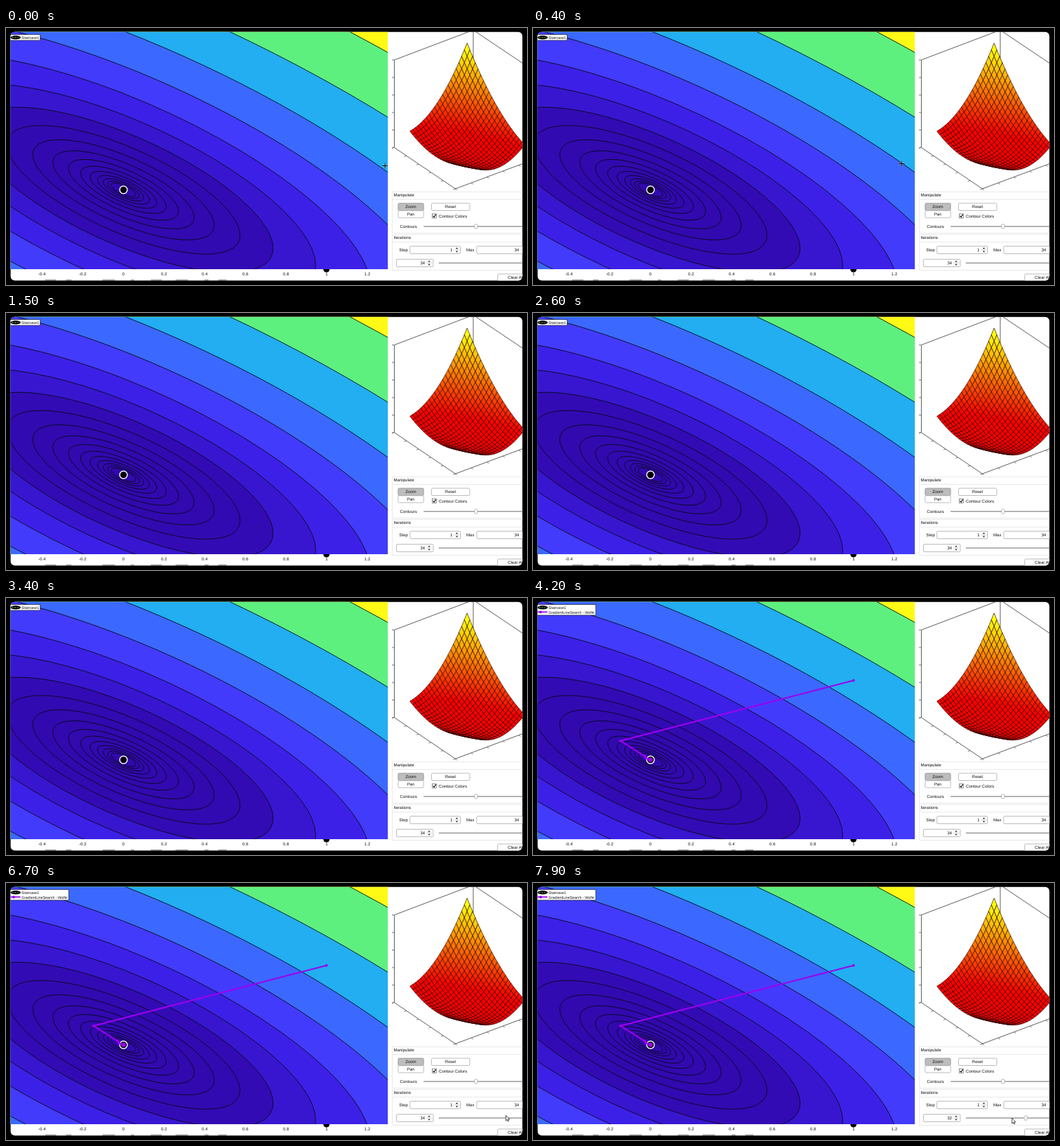
Animation, 756 px wide and 374 px high, one loop 8000 ms. Source, as an HTML page:

```html
<!DOCTYPE html>
<html lang="en">
<head>
<meta charset="utf-8">
<title>Contour line search</title>
<style>
  html, body { margin: 0; width: 100%; height: 100%; overflow: hidden; background: #000; }
  svg { display: block; width: 756px; height: 374px; }
  text { font: 6.1px "Liberation Sans", Arial, sans-serif; fill: #111; text-rendering: geometricPrecision; }
  .small { font-size: 5.4px; }
  .end { text-anchor: end; }
  .mid { text-anchor: middle; }
</style>
</head>
<body>
<svg viewBox="0 0 756 374">
  <defs>
    <clipPath id="screen"><rect x="6.7" y="5.8" width="742.6" height="361.6" rx="6"/></clipPath>
    <clipPath id="plotArea"><rect x="6" y="5" width="548" height="346"/></clipPath>
  </defs>
  <rect width="756" height="374"/>
  <g clip-path="url(#screen)">
    <rect width="756" height="374" fill="#fff"/>
    <g id="contours" clip-path="url(#plotArea)"></g>
    <g id="ticks"></g>
    <path d="M460.4 351A4.6 4.6 0 0 0 469.6 351Z"/>
    <path d="M57 367H73M87 367H95M140 367H158M181 367H186M210 367H226M246 367H264M288 367H294M308 367H320" stroke="#333"/>
    <circle cx="170.5" cy="235.5" r="5.5" stroke="#fff" stroke-width="1.4"/>
    <g id="route" fill="#9b00f0"></g>
    <g id="legend">
      <rect id="legendBox" x="5" y="9.5" fill="#fff" stroke="#222" stroke-width=".7"/>
      <ellipse cx="14" cy="13.8" rx="7.5" ry="2.7"/>
      <path d="M8 13.8H18" stroke="#6c9a4a" stroke-width="1" stroke-dasharray="3 1"/>
      <text class="small" x="22.6" y="15.8">Staircase1</text>
      <g id="legendRoute">
        <path d="M6 20.4H21" stroke="#9b00f0" stroke-width="1.6"/>
        <circle cx="11" cy="20.4" r="2" fill="#9b00f0"/>
        <text class="small" x="22.6" y="22.6">GradientLineSearch - Wolfe</text>
      </g>
    </g>
    <g id="surface"></g>
    <g id="panel"></g>
    <g id="thumb"><rect x="-2" y="338.8" width="4" height="6.4" rx="1" fill="#fff" stroke="#aaa" stroke-width=".8"/></g>
    <g id="cross">
      <path d="M-4 0H4M0 -4V4" stroke="#fff" stroke-opacity=".45" stroke-width="2.2"/>
      <path d="M-4 0H4M0 -4V4" stroke="#000" stroke-width="1"/>
    </g>
    <path id="arrow" d="M0 -4V4L1.8 2.3L3 5L4.2 4.4L3 1.9H5.4Z" fill="#fff" stroke="#000" stroke-width=".7"/>
  </g>
</svg>
<script>
const NS = "http://www.w3.org/2000/svg";
const $ = id => document.getElementById(id);

function add(parent, tag, attrs, content) {
  const node = document.createElementNS(NS, tag);
  for (const key in attrs) node.setAttribute(key, attrs[key]);
  if (content !== undefined) node.textContent = content;
  parent.appendChild(node);
  return node;
}

const quadratic = (x, y) => 2 * x * x + 2 * x * y + y * y;

function buildContours() {
  const fills = ["#5df07f", "#22aef1", "#3b69ff", "#433bfc", "#3d20e7", "#3816cf", "#330bb4", "#320ab1", "#3109ae"];
  const group = $("contours");
  add(group, "rect", { width: 560, height: 360, fill: "#fff916" });
  for (let k = 0; k < 17; k++) {
    add(group, "circle", {
      r: Math.exp((2.387 - k / 2) / 2),
      transform: "matrix(295 115.5 0 115.5 170.5 235.5)",
      fill: fills[Math.min(k, fills.length - 1)],
      stroke: "#080818", "stroke-width": 0.9, "vector-effect": "non-scaling-stroke"
    });
  }
  for (let i = -2; i <= 6; i++) {
    add($("ticks"), "text", { x: 170.3 + i * 59, y: 359.6, class: "mid" }, String(i / 5));
  }
}

function buildRoute() {
  const points = [[465, 120], [127, 208], [162, 230], [164, 233], [170.5, 235.5]];
  add($("route"), "polyline", { points: points.join(" "), fill: "none", stroke: "#9b00f0", "stroke-width": 2.1 });
  points.forEach(([cx, cy], i) => add($("route"), "circle", { cx, cy, r: i === 4 ? 3.2 : 2 }));
}

function buildSurface() {
  const group = $("surface"), cells = 21;
  const floor = (s, t) => [563 + 89 * s + 115 * t, 174 + 60 * s - 43 * t];
  const height = (a, b) => quadratic(1.3 - 1.85 * a, 3 * b - 1);
  const project = (a, b) => {
    const [x, y] = floor(0.03 + 0.94 * a, 0.177 + 0.722 * b);
    return [x, y - 2 - 9 * height(a, b)];
  };
  add(group, "path", {
    d: "M678 131V3L563.5 46.5V174L652 234L767 191M678 3L767 63",
    fill: "none", stroke: "#333", "stroke-width": 0.8
  });
  let marks = "";
  for (let i = 0; i <= 5; i++) {
    marks += `M563 ${46.5 + i * 25.5}h-3`;
    const [x, y] = floor(i / 5, 0), [u, v] = floor(1, i / 5);
    marks += `M${x} ${y}l-3 1.2M${u} ${v}l2.6 1.8`;
  }
  add(group, "path", { d: marks, stroke: "#555", "stroke-width": 0.8 });
  for (let i = 0; i < cells; i++) {
    for (let j = cells - 1; j >= 0; j--) {
      const corners = [[i, j], [i + 1, j], [i + 1, j + 1], [i, j + 1]];
      const level = (height((i + 0.5) / cells, (j + 0.5) / cells) - 2) / 9.6;
      add(group, "polygon", {
        points: corners.map(([a, b]) => project(a / cells, b / cells)).join(" "),
        fill: `rgb(255,${Math.round(255 * Math.max(0, Math.min(1, level)))},0)`,
        stroke: "#200", "stroke-width": 0.65, "stroke-linejoin": "round"
      });
    }
  }
}

function buildPanel() {
  const panel = $("panel");
  const box = (x, y, width, height, fill = "#fff", stroke = "#aaa", rx = 1.5) =>
    add(panel, "rect", { x, y, width, height, fill, stroke, rx, "stroke-width": 0.8 });
  const label = (x, y, content, cls = "") => add(panel, "text", { x, y, class: cls }, content);
  const line = (d, stroke, width = 0.8) => add(panel, "path", { d, stroke, fill: "none", "stroke-width": width });
  const spinner = (x, y) => {
    line(`M${x - 5} ${y}h10`, "#ccc", 0.6);
    add(panel, "path", { d: `M${x - 1.8} ${y - 1.6}h3.6l-1.8 -2.2zM${x - 1.8} ${y + 1.6}h3.6l-1.8 2.2z`, fill: "#333" });
  };

  line("M756 238.5H560.5V298.5H756M756 300.5H560.5V352.5H756M561 249.5H756M561 311.5H756", "#e4e4e4");
  label(562.5, 245.2, "Manipulate");
  label(562.5, 307.2, "Iterations");
  box(569, 255, 37, 10.5, "#bdbdbd", "#909090");
  box(569, 265.8, 37, 10.2);
  box(617.5, 255, 55.5, 10.5);
  label(587.3, 262.4, "Zoom", "mid");
  label(587.3, 273, "Pan", "mid");
  label(645, 262.4, "Reset", "mid");

  box(618.5, 270.5, 6, 6, "#fff", "#777", 0);
  line("M619.6 273.5L621.2 275.2L623.8 271.4", "#000", 1.1);
  label(628, 275.8, "Contour Colors");
  label(571.5, 290.8, "Contours");
  line("M606 288.8H756", "#9a9a9a", 1.4);
  box(680, 285.6, 4, 6.4, "#fff", "#aaa", 1);

  label(570.5, 325.2, "Step");
  box(586, 317.5, 73.5, 11);
  label(648, 325.4, "1", "end");
  spinner(654.2, 323);
  label(668, 325.2, "Max");
  box(683, 317.5, 73, 11);
  label(744.5, 325.4, "34", "end");
  spinner(751.5, 323);
  box(566.5, 336.5, 53.5, 11);
  label(608, 344.3, "34", "end").id = "count";
  spinner(614, 342);
  line("M628 342H756", "#9a9a9a", 1.4);
  box(713.5, 358, 50, 10);
  label(728, 365.2, "Clear All");
}

// Each key is [time, x, y].
const cursorKeys = [
  [0, 550, 200.5], [400, 535, 197.5], [900, -10, 250], [5400, -10, 272],
  [5700, 172.5, 293], [6300, 672, 340], [6900, 752, 343], [7300, 752, 343], [7900, 695, 346], [8000, 692, 346]
];
const thumbKeys = [[0, 760], [7300, 760], [7900, 715], [8000, 712]];

function sample(keys, time) {
  const next = Math.max(1, keys.findIndex(key => key[0] >= time));
  const a = keys[next - 1], b = keys[next];
  const p = (time - a[0]) / (b[0] - a[0]);
  return a.slice(1).map((value, i) => value + (b[i + 1] - value) * p);
}

function show(node, visible) { node.style.display = visible ? "" : "none"; }

function render(now) {
  const time = Math.floor((now % 8000) / 100) * 100;
  const searching = time >= 3700;
  show($("route"), searching);
  show($("legendRoute"), searching);
  $("legendBox").setAttribute("width", searching ? 86 : 44.5);
  $("legendBox").setAttribute("height", searching ? 15.5 : 8.5);

  const [x, y] = sample(cursorKeys, time);
  for (const id of ["cross", "arrow"]) $(id).setAttribute("transform", `translate(${x} ${y})`);
  show($("cross"), x < 554);
  show($("arrow"), x >= 554);

  const [thumbX] = sample(thumbKeys, time);
  $("thumb").setAttribute("transform", `translate(${thumbX} 0)`);
  $("count").textContent = time < 7500 ? 34 : time < 7700 ? 33 : 32;
  requestAnimationFrame(tick);
}

const start = performance.now();
function tick() { render(performance.now() - start); }

buildContours();
buildRoute();
buildSurface();
buildPanel();
tick();
</script>
</body>
</html>
```
